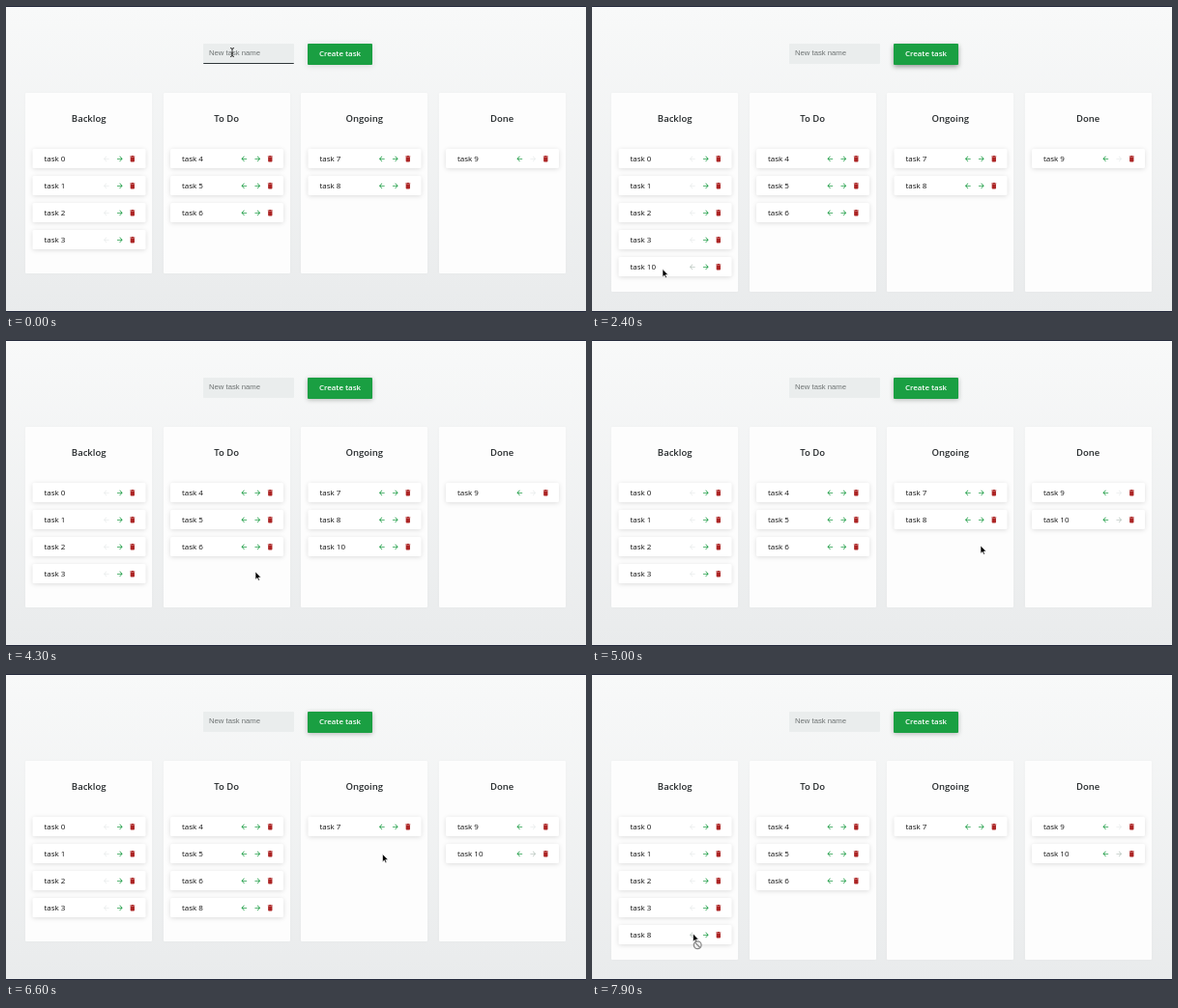
Animation, 600 px wide and 317 px high, one loop 8000 ms. Source, as an HTML page:

```html
<!DOCTYPE html>
<html lang="en">
<head>
<meta charset="utf-8">
<title>Task board</title>
<style>
  html, body { margin: 0; width: 100%; height: 100%; overflow: hidden; }
  body { font: 8px "Open Sans", sans-serif; color: #111; }
  #stage {
    position: relative; width: 600px; height: 317px; overflow: hidden;
    background: linear-gradient(#f8f9f9, #e9ebec);
  }
  #stage::before, #stage::after {
    content: ""; position: absolute; left: 0; right: 0; height: 1px; background: #23283a;
  }
  #stage::before { top: 0; }
  #stage::after { bottom: 0; }
  #stage > * { position: absolute; box-sizing: border-box; }
  #field {
    left: 204px; top: 39px; width: 93.5px; height: 21px; padding-left: 6px;
    font: 7.7px/20px "Liberation Sans", Arial, sans-serif; white-space: pre;
    background: #eaeded; border-bottom: 1px solid transparent; border-radius: 1px;
    color: #111;
  }
  #field.empty { color: #6d7272; }
  #field.focus { border-color: #30373a; }
  #caret { left: 210px; top: 44px; width: .6px; height: 10px; background: #111; }
  #button {
    left: 312px; top: 39px; width: 67px; height: 21.5px; border-radius: 1px;
    background: #1a9f42; color: #fff; font-weight: 600; font-size: 7.9px;
    line-height: 21px; text-align: center;
    box-shadow: 0 1px 6px rgba(0, 0, 0, .13);
  }
  #button.hover { box-shadow: 0 2px 5px rgba(0, 0, 0, .38); }
  #button.used { box-shadow: 0 1px 5px rgba(0, 0, 0, .27); }
  .column {
    top: 90px; width: 131.4px; background: #fdfdfd; border-radius: 1px;
    box-shadow: 0 0 4px rgba(0, 0, 0, .025);
    font-size: 9.5px; font-weight: 600; line-height: 54px; text-align: center; color: #262a2c;
  }
  .card {
    left: 0; top: 0; width: 116.5px; height: 20px; padding-left: 12px; line-height: 20px;
    background: #fff; border-radius: 1.5px; box-shadow: 0 1px 5px rgba(0, 0, 0, .13);
  }
  .card svg { position: absolute; top: 5.7px; width: 8.6px; height: 8.6px; }
  .left { left: 71.7px; }
  .right { left: 85.5px; }
  .bin { left: 98.8px; fill: #ac2424; }
  .arrow { fill: #24a04b; }
  .arrow.off { fill: #eaeded; }
  .arrow.off.pale { fill: #bdc9c2; }
  #pointer { left: 0; top: 0; width: 1px; height: 1px; overflow: visible; }
</style>
</head>
<body>
<div id="stage">
  <div id="field"></div>
  <div id="caret"></div>
  <div id="button">Create task</div>
  <svg id="pointer">
    <g data-kind="beam" fill="none" stroke="#222" stroke-width=".9">
      <path d="M-2-4.5Q0-4.5 0-3V3Q0 4.5-2 4.5M2-4.5Q0-4.5 0-3M0 3Q0 4.5 2 4.5M-1 1H1"/>
    </g>
    <g data-kind="arrow no" fill="#000" stroke="#fff" stroke-width=".6">
      <path d="M0 0V8.2L1.9 6.5 3.1 9.2 4.4 8.6 3.2 6H5.8Z"/>
    </g>
    <g data-kind="no" fill="#eee" stroke="#858585" stroke-width="1.2">
      <circle cx="4.7" cy="11.8" r="3.9"/><path d="M2 9.1L7.4 14.5"/>
    </g>
    <g data-kind="hand" fill="#fff" stroke="#111" stroke-width=".7" stroke-linejoin="round">
      <path d="M-.8 .6Q0-.6.8.6V4Q1.7 3.2 2.3 4.2 3.2 3.5 3.7 4.6 4.8 4.2 4.8 5.5V7.6L3.8 10H-.8L-3.2 6.7Q-3.3 5.2-1.8 5.8L-.8 6.8Z"/>
    </g>
  </svg>
</div>
<script>
const LOOP = 8000;
const COLUMN_X = [20, 162.5, 305, 447.5];
const TITLES = ["Backlog", "To Do", "Ongoing", "Done"];
const START = [[0, 1, 2, 3], [4, 5, 6], [7, 8], [9]];
const ARROW = "M20 11H7.83l5.59-5.59L12 4l-8 8 8 8 1.41-1.41L7.83 13H20z";
const BIN = "M6 19c0 1.1.9 2 2 2h8c1.1 0 2-.9 2-2V7H6zM19 4h-3.5l-1-1h-5l-1 1H5v2h14z";

// time, task, destination column
const MOVES = [
  [1800, 10, 0], [3600, 10, 1], [4200, 10, 2],
  [4900, 10, 3], [6600, 8, 1], [7600, 8, 0],
];

// time, x, y, pointer shape
const PATH = [
  [0, 234, 48, "beam"], [200, 234, 48, "none"], [1000, 240, 48, "beam"],
  [1200, 300, 51, "arrow"], [1400, 338, 60.5, "arrow"], [1600, 338, 52, "hand"],
  [2000, 320, 68, "arrow"], [2200, 150, 220, "arrow"], [2400, 73, 272.5, "arrow"],
  [2600, 60, 277, "arrow"], [3100, 116, 274, "arrow"], [3400, 117.5, 268, "hand"],
  [3600, 117.5, 268, "arrow"], [3900, 165, 261, "arrow"], [4000, 230, 246, "arrow"],
  [4100, 258, 240, "hand"], [4200, 258, 240, "arrow"], [4400, 310, 230, "arrow"],
  [4600, 402, 213, "hand"], [4900, 402, 213, "arrow"], [5200, 500, 196, "arrow"],
  [5400, 545, 187, "no"], [5600, 546, 187, "no"], [5900, 430.5, 236.5, "arrow"],
  [6100, 408, 210, "arrow"], [6200, 388, 194, "arrow"], [6400, 389.5, 186.5, "hand"],
  [6600, 389.5, 186.5, "arrow"], [6900, 335, 206, "arrow"], [7100, 262, 236, "arrow"],
  [7200, 242, 241, "arrow"], [7400, 246, 239.5, "hand"], [7600, 246, 239.5, "arrow"],
  [7900, 104.5, 269, "no"],
];

const stage = document.getElementById("stage");
const field = document.getElementById("field");
const caret = document.getElementById("caret");
const button = document.getElementById("button");
const pointer = document.getElementById("pointer");

function addBox(className, html) {
  const box = document.createElement("div");
  box.className = className;
  box.innerHTML = html;
  stage.insertBefore(box, pointer);
  return box;
}

const icon = (className, path, flip = "") =>
  `<svg class="${className}" viewBox="0 0 24 24"><path d="${path}" ${flip}/></svg>`;

const columns = TITLES.map((title, i) => {
  const column = addBox("column", title);
  column.style.left = COLUMN_X[i] + "px";
  return column;
});

const cards = Array.from({ length: 11 }, (_, i) => addBox("card", `task ${i}` +
  icon("arrow left", ARROW) +
  icon("arrow right", ARROW, 'transform="matrix(-1 0 0 1 24 0)"') +
  icon("bin", BIN)));

function boardAt(time) {
  const board = START.map(list => [...list]);
  const moved = new Set();
  for (const [when, task, to] of MOVES) {
    if (time < when) break;
    for (const list of board) {
      const at = list.indexOf(task);
      if (at >= 0) list.splice(at, 1);
    }
    board[to].push(task);
    moved.add(task);
  }
  return { board, moved };
}

function drawBoard(time) {
  const { board, moved } = boardAt(time);
  const rows = Math.max(...board.map(list => list.length));
  const height = Math.max(187, 66 + 28 * rows);
  columns.forEach(column => column.style.height = height + "px");
  cards.forEach(card => card.style.visibility = "hidden");
  board.forEach((list, c) => list.forEach((task, row) => {
    const card = cards[task];
    card.style.visibility = "visible";
    card.style.transform = `translate(${COLUMN_X[c] + 7.5}px, ${148 + 28 * row}px)`;
    const [left, right] = card.querySelectorAll(".arrow");
    left.classList.toggle("off", c === 0);
    right.classList.toggle("off", c === 3);
    left.classList.toggle("pale", moved.has(task));
    right.classList.toggle("pale", moved.has(task));
  }));
}

function drawForm(time) {
  const typed = time < 1800 ? "task 10".slice(0, Math.max(0, time / 100 - 1)) : "";
  field.textContent = typed || "New task name";
  field.classList.toggle("empty", !typed);
  field.classList.toggle("focus", time < 1600);
  const ctx = drawForm.ctx ||= document.createElement("canvas").getContext("2d");
  ctx.font = '7.7px "Liberation Sans", Arial, sans-serif';
  caret.style.left = 210 + ctx.measureText(typed).width + "px";
  caret.style.visibility = time >= 100 && time < 1000 ? "visible" : "hidden";
  button.className = time < 1600 ? "" : time < 2900 ? "hover" : "used";
}

// The pointer rests on each pose until the next one.
function drawPointer(time) {
  const [, x, y, kind] = PATH.findLast(pose => pose[0] <= time);
  pointer.style.transform = `translate(${x}px, ${y}px)`;
  for (const shape of pointer.children) {
    shape.style.display = shape.dataset.kind.split(" ").includes(kind) ? "" : "none";
  }
}

let start;
let shown = -1;
function tick(now) {
  start ??= now;
  const time = Math.floor((now - start) % LOOP / 100) * 100;
  if (time !== shown) {
    shown = time;
    drawBoard(time);
    drawForm(time);
    drawPointer(time);
  }
  requestAnimationFrame(tick);
}
requestAnimationFrame(tick);
</script>
</body>
</html>
```
